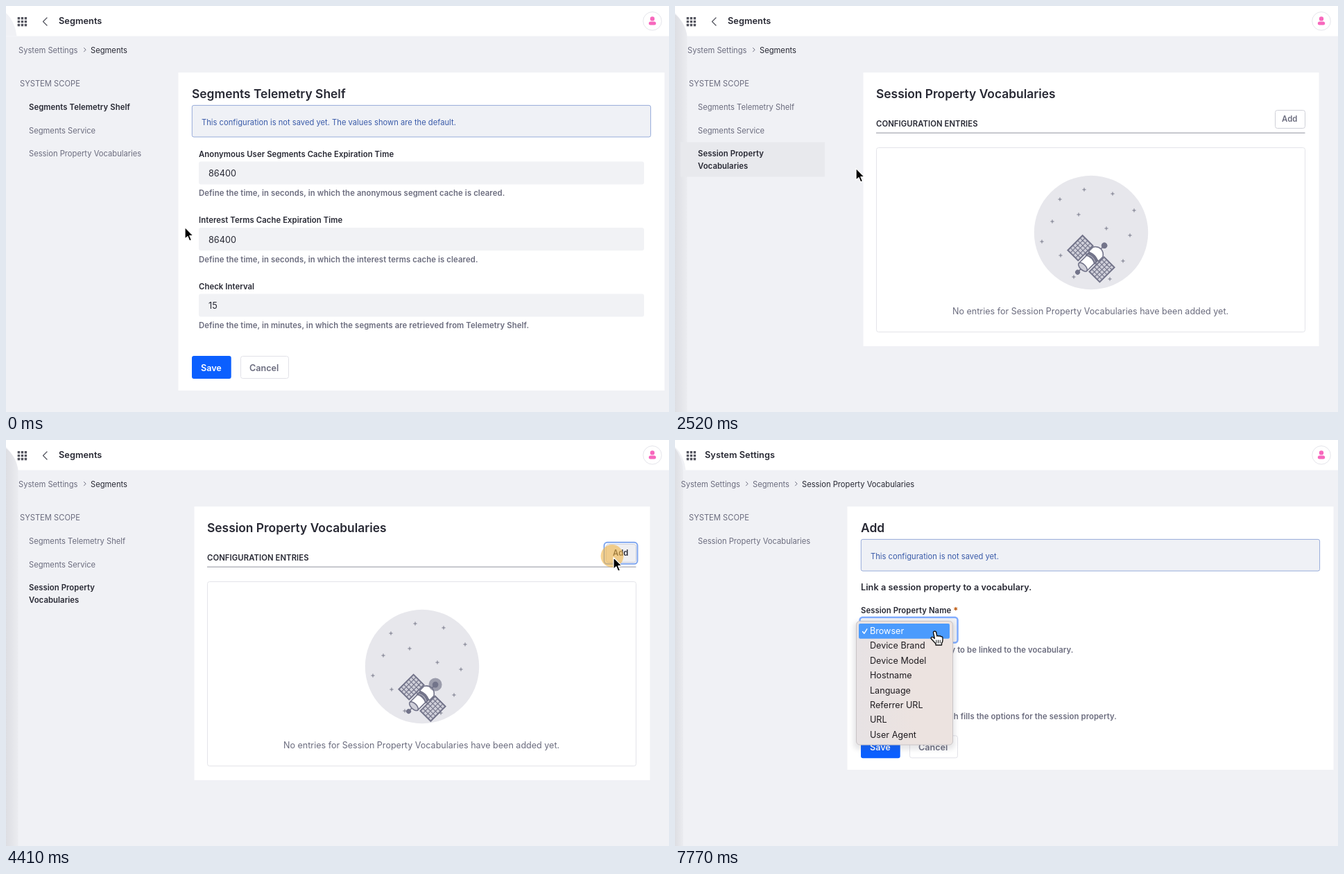
Animation of 956 by 586 pixels, one loop 8000 ms. Source, as an HTML page:

```html
<!DOCTYPE html>
<html lang="en">
<head>
<meta charset="utf-8">
<title>Settings walkthrough</title>
<style>
  html, body { margin: 0; width: 100%; height: 100%; overflow: hidden; background: #f0f1f5; }
  svg { display: block; width: 956px; height: 586px; font-family: Inter, Roboto, sans-serif; }
  text { white-space: pre; }
  .small { font-size: 11.2px; fill: #6b6c7e; }
  .strong { font-size: 11.3px; font-weight: 600; letter-spacing: .08px; fill: #272833; }
  .crumb { font-size: 11.2px; fill: #272833; }
  .help { font-size: 11.3px; font-weight: 600; letter-spacing: .105px; fill: #6b6c7e; }
  .note { font-size: 11.2px; fill: #3a5ba9; }
  .title { font-size: 17.4px; font-weight: 600; fill: #272833; }
  .head { font-size: 12.75px; font-weight: 600; letter-spacing: .05px; fill: #272833; }
  .lead { font-size: 12.65px; font-weight: 600; letter-spacing: .08px; fill: #272833; }
  .value { font-size: 12.7px; fill: #272833; }
  .item { font-size: 12.6px; fill: #1f1c20; }
  .empty { font-size: 12.55px; fill: #6b6c7e; }
  .button { font-size: 12.6px; font-weight: 600; fill: #6b6c7e; }
</style>
</head>
<body>
<svg id="stage" viewBox="0 0 956 586"></svg>
<script>
const LOOP = 8000;
const PAGE_TWO = 1330, PAGE_THREE = 4760, MENU = 6600;

const text = (x, y, style, content, extra = '') =>
  `<text x="${x}" y="${y}" class="${style}" ${extra}>${content}</text>`;
const rect = (x, y, w, h, fill, r = 0, stroke = 'none', extra = '') =>
  `<rect x="${x}" y="${y}" width="${w}" height="${h}" rx="${r}" fill="${fill}" stroke="${stroke}" ${extra}/>`;
const circle = (x, y, r, fill, extra = '') =>
  `<circle cx="${x}" cy="${y}" r="${r}" fill="${fill}" ${extra}/>`;
const path = (d, fill, stroke = 'none', width = 1) =>
  `<path d="${d}" fill="${fill}" stroke="${stroke}" stroke-width="${width}" stroke-linejoin="round" stroke-linecap="round"/>`;
const group = (id, content, extra = '') => `<g id="${id}" ${extra}>${content}</g>`;
const chevron = x => path(`M${x} 60.5l2.6 2.7-2.6 2.7`, 'none', '#6b6c7e');

const alertBox = message =>
  rect(268.3, 143.4, 661.3, 45.6, '#eff1f6', 2.5, '#96abd9') + text(282, 171.5, 'note', message);

const buttons = y =>
  rect(268, y, 56.7, 33, '#0b5fff', 3) +
  text(281, y + 21.6, 'button', 'Save', 'style="fill:#fff"') +
  rect(338.5, y + .5, 69, 32, '#fff', 3, '#e2e2e8') +
  text(351, y + 21.6, 'button', 'Cancel');

const field = (y, label, value, help) =>
  text(278, y, 'strong', label) +
  rect(278, y + 7, 642, 33, '#f1f2f5', 3) +
  text(292, y + 28.5, 'value', value) +
  text(278, y + 56.5, 'help', help);

const select = (y, width, label, starX, value, help) =>
  text(268, y, 'strong', label) +
  text(starX, y + 1, 'strong', '*', 'style="fill:#b95000;font-size:13px"') +
  rect(268, y + 7.5, width, 33.5, '#f1f2f5', 3) +
  text(282, y + 29, 'value', value) +
  path(`M${268 + width - 21} ${y + 23}h8l-4-5zm0 3.5h8l-4 5z`, '#6b6c7e') +
  text(268, y + 57, 'help', help);

const sidebar = (items, active) =>
  text(20, 116, 'small', 'SYSTEM SCOPE') +
  items.map((item, i) => text(33, 150 + 33.7 * i, i === active ? 'strong' : 'small', item)).join('');

const segmentsHeader =
  path('M59 17l-5.5 5.5 5.5 5.5', 'none', '#54555f', 1.3) +
  text(76, 26.3, 'head', 'Segments') +
  text(18, 67.5, 'small', 'System Settings') + chevron(112.5) +
  text(122, 67.5, 'crumb', 'Segments');

function appBar() {
  let dots = '';
  for (let i = 0; i < 9; i++)
    dots += rect(16.7 + i % 3 * 5, 16 + Math.floor(i / 3) * 4.9, 3.4, 3.4, '#54555f', .5);
  return rect(0, 0, 956, 43.5, '#fff') + path('M0 10Q13 22 15.5 43.5H0Z', '#f0f1f5') + dots +
    circle(932, 21.8, 13.3, '#fff', 'stroke="#e5e5eb"') +
    circle(932, 18.4, 3.2, '#f768bd') + rect(926.8, 22.4, 10.4, 5, '#f768bd', 2.5);
}

const firstPage = () => segmentsHeader +
  sidebar(['Segments Telemetry Shelf', 'Segments Service', 'Session Property Vocabularies'], 0) +
  rect(248.5, 96, 701, 459, '#fff') +
  text(268, 132.5, 'title', 'Segments Telemetry Shelf') +
  alertBox('This configuration is not saved yet. The values shown are the default.') +
  field(217.5, 'Anonymous User Segments Cache Expiration Time', '86400',
    'Define the time, in seconds, in which the anonymous segment cache is cleared.') +
  field(313, 'Interest Terms Cache Expiration Time', '86400',
    'Define the time, in seconds, in which the interest terms cache is cleared.') +
  field(408.5, 'Check Interval', '15',
    'Define the time, in minutes, in which the segments are retrieved from Telemetry Shelf.') +
  buttons(505);

function satellite() {
  const ink = '#73748a';
  const panel = y => {
    let lines = '';
    for (let i = 1; i < 6; i++) lines += `M${-15 + i * 5} ${y}v21`;
    for (let i = 1; i < 4; i++) lines += `M-15 ${y + i * 5.25}h30`;
    return rect(-15, y, 30, 21, '#cfcfd9', 0, ink, 'stroke-width="2"') + path(lines, 'none', ink, 1.1);
  };
  return panel(-32.5) + panel(11.5) +
    path('M-27 0H27M0-12V12', 'none', ink, 1.6) +
    path('M-17-8H2V8H-17Z', '#fff', ink, 1.6) +
    path('M5-10H14Q20-6 20 0T14 10H5Z', '#fff', ink, 1.6) +
    path('M-2-9Q3 0-2 9H5Q9 0 5-9Z', ink, ink) +
    path('M1-7Q5 0 1 7', 'none', '#b9bac6', 1) +
    `<ellipse cx="-17" rx="4" ry="8" fill="#cfcfd9" stroke="${ink}" stroke-width="1.6"/>` +
    circle(-27.5, 0, 3.5, ink) + circle(27, 0, 4.3, ink) +
    circle(27, 0, 4, ink, 'id="pulse"');
}

function secondPage() {
  const stars = [[590, 265], [555, 279], [631, 271], [662, 295], [582, 301], [544, 311], [622, 321],
    [656, 331], [529, 340], [556, 360], [646, 368], [575, 391], [627, 394]];
  const starPath = stars.map(([x, y]) => `M${x - 2.2} ${y}h4.4m-2.2-2.2v4.4`).join('');
  return segmentsHeader +
    rect(8, 196.5, 208, 50, '#e8e9ed', 0, 'none', 'id="hover"') +
    sidebar(['Segments Telemetry Shelf', 'Segments Service', 'Session Property'], 2) +
    text(33, 234.5, 'strong', 'Vocabularies') +
    rect(271.5, 96, 657, 395, '#fff') +
    text(290, 132.5, 'title', 'Session Property Vocabularies') +
    text(290, 173.7, 'strong', 'CONFIGURATION ENTRIES') +
    rect(290, 182.6, 618.5, 1.2, '#a4a5ae') +
    rect(865.5, 150.5, 43, 26, '#fff', 3, '#cfd0d8', 'id="addBox"') +
    rect(862.5, 147.8, 48, 31, 'none', 4.5, '#7ea5ee', 'stroke-width="2" id="addRing"') +
    text(875, 167, 'strong', 'Add', 'id="addLabel"') +
    rect(290.5, 204.5, 618, 266, '#fff', 3, '#e3e4e9') +
    circle(600, 327, 82.2, '#e7e7ec') + path(starPath, 'none', '#777889', 1) +
    group('satellite', satellite()) +
    text(400, 444.5, 'empty', 'No entries for Session Property Vocabularies have been added yet.');
}

const thirdPage = () =>
  text(43, 26.3, 'head', 'System Settings') +
  text(8.5, 67.5, 'small', 'System Settings') + chevron(102.5) +
  text(112, 67.5, 'small', 'Segments') + chevron(173.5) +
  text(183, 67.5, 'crumb', 'Session Property Vocabularies') +
  sidebar(['Session Property Vocabularies'], -1) +
  rect(248.5, 96, 701, 380, '#fff') +
  text(268, 132.5, 'title', 'Add') +
  alertBox('This configuration is not saved yet.') +
  text(268, 217.3, 'lead', 'Link a session property to a vocabulary.') +
  select(250, 138, 'Session Property Name', 401.3, 'Browser',
    'Set the session property to be linked to the vocabulary.') +
  select(345.5, 105.5, 'Vocabulary Name', 368.3, 'Audience',
    'Set the vocabulary which fills the options for the session property.') +
  buttons(426.3);

function menu() {
  const items = ['Browser', 'Device Brand', 'Device Model', 'Hostname', 'Language', 'Referrer URL', 'URL', 'User Agent'];
  return rect(266.5, 256, 141, 36.5, 'none', 4, '#80acff', 'stroke-width="2.5"') +
    rect(257, 262, 147, 185, '#50505c', 8, 'none', 'opacity=".13" filter="url(#blur)"') +
    rect(261.5, 261.5, 139, 178.5, 'url(#menuFill)', 5, '#c9c4c6') +
    rect(265, 265, 131, 21.8, '#4b9bfd', 2) +
    path('M270.5 276.5l2.3 2.8 4-6.5', 'none', '#fff', 1.4) +
    items.map((item, i) => text(281, 280 + 21.4 * i, 'item', item, i ? '' : 'style="fill:#fff"')).join('');
}

const arrow = path('M0 0V17L3.9 13.3 6.6 19.7 9.5 18.5 6.8 12.2H12Z', '#000', '#fff', 1.2);
const hand =
  path('M-1 2Q-1 0 1 0T3.2 2L4.3 7Q5.8 5.8 7.2 7.2 8.8 6.2 10 7.8 12.5 7.2 12.5 10V13Q12.5 15.5 11 17V20H2.5V18L-3.8 11.3Q-5 9.4-3.4 8.6T.8 10.5Z', '#fff', '#111', 1.4) +
  path('M3.3 13v4M6 13v4M8.7 13v4', 'none', '#111', 1);

const stage = document.getElementById('stage');
stage.innerHTML = `<defs>
  <filter id="blur" x="-20%" y="-20%" width="140%" height="140%"><feGaussianBlur stdDeviation="3"/></filter>
  <linearGradient id="menuFill"><stop stop-color="#e7e2e4"/><stop offset=".6" stop-color="#ece3e0"/></linearGradient>
  <linearGradient id="edgeFill"><stop stop-color="#dddee3"/><stop offset="1" stop-color="#ebecf0"/></linearGradient>
  </defs>` + rect(0, 0, 956, 586, '#f0f1f5') + appBar() +
  group('edge', path('M0 12Q15 24 17.5 43.5V586H0Z', 'url(#edgeFill)')) +
  group('first', firstPage()) + group('second', secondPage()) + group('third', thirdPage()) +
  group('menu', menu()) +
  circle(0, 0, 17, '#f2b84b', 'id="halo"') + group('arrow', arrow) + group('hand', hand);

const parts = {};
stage.querySelectorAll('[id]').forEach(el => parts[el.id] = el);

// time, x, y, and whether the move towards this point is linear
const pointer = [
  [0, 258, 319.3], [350, 258, 319.3], [1000, 118, 222], [2380, 118, 222], [2520, 260, 234.3, true],
  [3010, 772, 235.3, true], [3150, 832, 219, true], [3650, 832, 219], [4150, 876, 169.5],
  [5200, 876, 169.5], [6150, 373.5, 276], [LOOP, 373.5, 276]
];
const clicks = [1100, 4340, 6540];

const clamp = v => Math.min(1, Math.max(0, v));
const ramp = (t, from, to) => clamp((t - from) / (to - from));
const show = (id, on) => parts[id].setAttribute('visibility', on ? 'visible' : 'hidden');
const move = (id, x, y, extra = '') => parts[id].setAttribute('transform', `translate(${x} ${y}) ${extra}`);

function pointerAt(t) {
  const i = pointer.findIndex(key => key[0] > t);
  const [t0, x0, y0] = pointer[i - 1], [t1, x1, y1, linear] = pointer[i];
  const p = ramp(t, t0, t1), k = linear ? p : p * p * (3 - 2 * p);
  return [x0 + (x1 - x0) * k, y0 + (y1 - y0) * k];
}

function draw(t) {
  const onSecond = t >= PAGE_TWO && t < PAGE_THREE;
  show('first', t < PAGE_TWO);
  show('second', onSecond);
  show('third', t >= PAGE_THREE);
  show('menu', t >= MENU);
  show('edge', onSecond || t >= MENU);
  move('edge', 0, 0, t >= MENU ? 'scale(.68 1)' : '');

  const [x, y] = pointerAt(t);
  const overLink = (t > 870 && t < 2420) || t > 6080;
  show('arrow', !overLink);
  show('hand', overLink);
  move('arrow', x, y);
  move('hand', x, y);

  const click = clicks.find(c => t >= c && t < c + 560);
  const age = click === undefined ? 1 : (t - click) / 560;
  move('halo', x - 2, y - 2, `scale(${.94 + .2 * age})`);
  parts.halo.setAttribute('opacity', .62 * (1 - age * age));

  parts.hover.setAttribute('opacity', ramp(t, 1700, 1850) * (1 - ramp(t, 2520, 2660)));
  parts.addBox.setAttribute('fill', t > 4050 ? '#eeeff3' : '#fff');
  parts.addLabel.style.fill = t > 4050 ? '#272833' : '#6b6c7e';
  show('addRing', onSecond && t >= 4340);

  const bob = 9.2 * (1 - Math.cos((t - 1480) / 4600 * 2 * Math.PI));
  move('satellite', 600, 357 + bob, 'rotate(-45)');
  const pulse = ramp(t, 4200, 4620);
  parts.pulse.setAttribute('r', 4 + 11 * pulse);
  parts.pulse.setAttribute('opacity', pulse < 1 ? clamp(1.3 * (1 - pulse)) : 0);
}

function tick() {
  draw(performance.now() % LOOP);
  requestAnimationFrame(tick);
}
tick();
</script>
</body>
</html>
```
